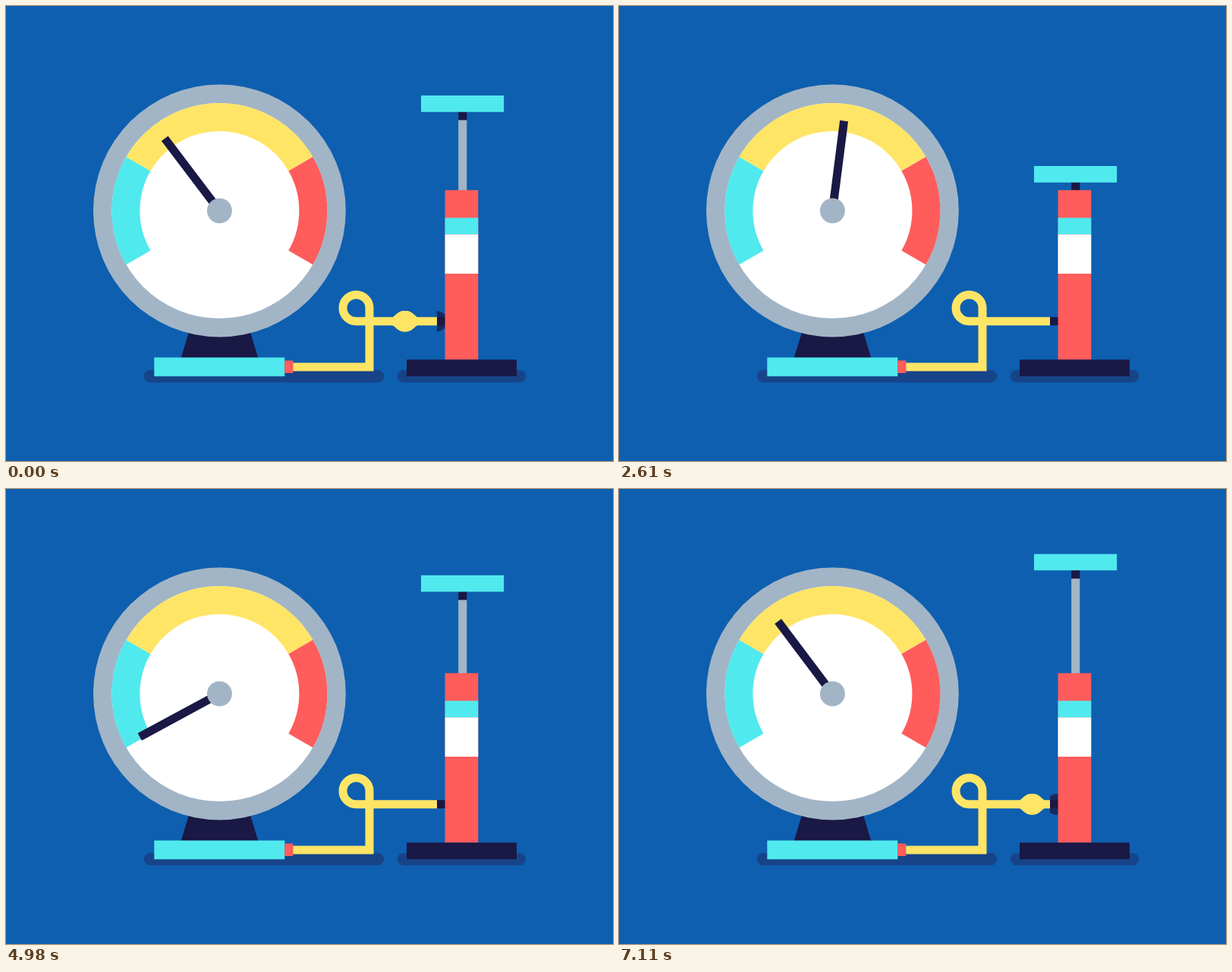
An HTML page with a canvas for the animation above (7.14 s loop, 800 by 600 pixels).

```html
<!DOCTYPE html>
<html lang="en">
<head>
<meta charset="utf-8">
<title>Pressure gauge and pump</title>
<style>
html, body { margin: 0; width: 100%; height: 100%; overflow: hidden; background: #0e5fb0; }
canvas { display: block; }
</style>
</head>
<body>
<canvas id="stage" width="800" height="600"></canvas>
<script>
const g = document.getElementById('stage').getContext('2d');
const LOOP = 7140, START = 680, TAU = Math.PI * 2;
const BLUE = '#0e5fb0', GREY = '#a2b5c6', YELLOW = '#ffe566', CYAN = '#50e9ee',
      RED = '#ff5c5c', DARK = '#1a1845', SHADOW = '#174489', WHITE = '#fff';

// Keyframes as [time, value], eased in and out between neighbours
const needleKeys = [[680, 92.5], [5120, -119], [5440, -119], [5740, -78], [6090, -80],
                    [6320, -28], [7250, -37.5], [7820, 92.5]];
const handleKeys = [[4350, 211], [5190, 96], [5270, 96], [5430, 211], [5440, 211], [5690, 96],
                    [5930, 96], [6090, 211], [6100, 211], [6356, 96], [6480, 96],
                    [7000, 49], [7046, 49], [7257, 211]];
const puffs = [5296, 5949, 7073];

function valueAt(keys, t) {
  if (t <= keys[0][0]) return keys[0][1];
  for (let i = 1; i < keys.length; i++) {
    const [t0, a] = keys[i - 1], [t1, b] = keys[i];
    if (t < t1) {
      const s = (t - t0) / (t1 - t0);
      return a + (b - a) * s * s * (3 - 2 * s);
    }
  }
  return keys[keys.length - 1][1];
}

function rect(color, x0, y0, x1, y1) {
  g.fillStyle = color;
  g.fillRect(x0, y0, x1 - x0, y1 - y0);
}

function disc(color, x, y, r) {
  g.fillStyle = color;
  g.beginPath();
  g.arc(x, y, r, 0, TAU);
  g.fill();
}

function shadow(x0, x1) {
  g.fillStyle = SHADOW;
  g.beginPath();
  g.roundRect(x0, 480, x1 - x0, 16.5, 8.25);
  g.fill();
}

function band(color, from, to) {
  g.strokeStyle = color;
  g.lineWidth = 37;
  g.beginPath();
  g.arc(281.4, 270, 123.5, (from - 90) * TAU / 360, (to - 90) * TAU / 360);
  g.stroke();
}

function gauge(angle) {
  g.fillStyle = DARK;
  g.beginPath();
  g.moveTo(241, 430);
  g.lineTo(322, 430);
  g.lineTo(332.3, 464);
  g.lineTo(230.7, 464);
  g.fill();
  rect(CYAN, 195.3, 463.5, 367.3, 488.3);
  rect(RED, 367.3, 467.5, 378.3, 484);
  disc(GREY, 281.4, 270, 166.4);
  disc(WHITE, 281.4, 270, 142);
  band(CYAN, -120, -60);
  band(YELLOW, -60, 60);
  band(RED, 60, 120);
  g.save();
  g.translate(281.4, 270);
  g.rotate(angle * TAU / 360);
  rect(DARK, -5.5, -119.5, 5.5, 0);
  g.restore();
  disc(GREY, 281.4, 270, 16.5);
}

// Half height of the hose at distance u from the middle of an air puff
function puffHeight(u) {
  const k = Math.abs(u / 16);
  return k < 1 ? 5.5 + 8.2 * (1 - k ** 2.5) ** 1.5 : 5.5;
}

// Point and direction of the hose at distance s from the pump
function hosePoint(s) {
  const R = 17.5, flat = 568 - 461.5, loop = flat + R * TAU * 0.75, drop = loop + 77.7;
  if (s < flat) return [568 - s, 415.7, Math.PI];
  if (s < loop) {
    const a = TAU / 4 + (s - flat) / R;
    return [461.5 + R * Math.cos(a), 398.2 + R * Math.sin(a), a + TAU / 4];
  }
  if (s < drop) return [479, 398.2 + s - loop, TAU / 4];
  return [479 - (s - drop), 475.9, Math.PI];
}

function hose(t) {
  g.strokeStyle = YELLOW;
  g.lineWidth = 11;
  g.beginPath();
  g.moveTo(568, 415.7);
  g.lineTo(461.5, 415.7);
  g.arc(461.5, 398.2, 17.5, TAU / 4, TAU);
  g.lineTo(479, 475.9);
  g.lineTo(378.3, 475.9);
  g.stroke();
  rect(DARK, 568, 410.2, 579, 421.2);
  for (const start of puffs) {
    const age = t - start;
    if (age < -40 || age > 640) continue;
    const mid = age * 0.62;
    for (let u = -16; u <= 16; u += 0.5) {
      const s = mid + u;
      if (s < 0 || s > 367) continue;
      const [x, y, a] = hosePoint(s), h = puffHeight(u);
      g.save();
      g.translate(x, y);
      g.rotate(a);
      rect(YELLOW, -0.6, -h, 0.6, h);
      g.restore();
    }
    // The connector swells just behind the puff
    const center = 578 - (age - 37) * 0.37;
    for (let x = 568; x < 579; x += 0.5) {
      const h = puffHeight(x + 0.25 - center);
      rect(DARK, x, 415.7 - h, x + 0.5, 415.7 + h);
    }
  }
}

function pump(y, bulge) {
  rect(GREY, 596.2, y + 32, 607.3, 243);
  rect(DARK, 596.2, y + 21, 607.3, y + 32.5);
  g.fillStyle = CYAN;
  g.beginPath();
  g.moveTo(547, y);
  g.lineTo(656.2, y);
  g.quadraticCurveTo(656.2 + bulge, y + 10.8, 656.2, y + 21.7);
  g.lineTo(547, y + 21.7);
  g.quadraticCurveTo(547 - bulge, y + 10.8, 547, y);
  g.fill();
  rect(RED, 578.6, 242.8, 622.3, 466.5);
  rect(CYAN, 578.6, 279.3, 622.3, 301.3);
  rect(WHITE, 578.6, 301.3, 622.3, 353);
  rect(DARK, 528, 466.3, 673, 488.3);
}

function draw(now) {
  let t = now % LOOP;
  if (t < START) t += LOOP;
  const strain = t > 6200 && t < 6800 ? 4 * Math.sin(Math.PI * (t - 6200) / 600) : 0;
  rect(BLUE, 0, 0, 800, 600);
  shadow(181.7, 498.2);
  shadow(515.7, 685.2);
  gauge(valueAt(needleKeys, t));
  hose(t);
  pump(valueAt(handleKeys, t), strain);
}

const begin = performance.now();
function tick() {
  draw(performance.now() - begin);
  requestAnimationFrame(tick);
}
tick();
</script>
</body>
</html>
```
